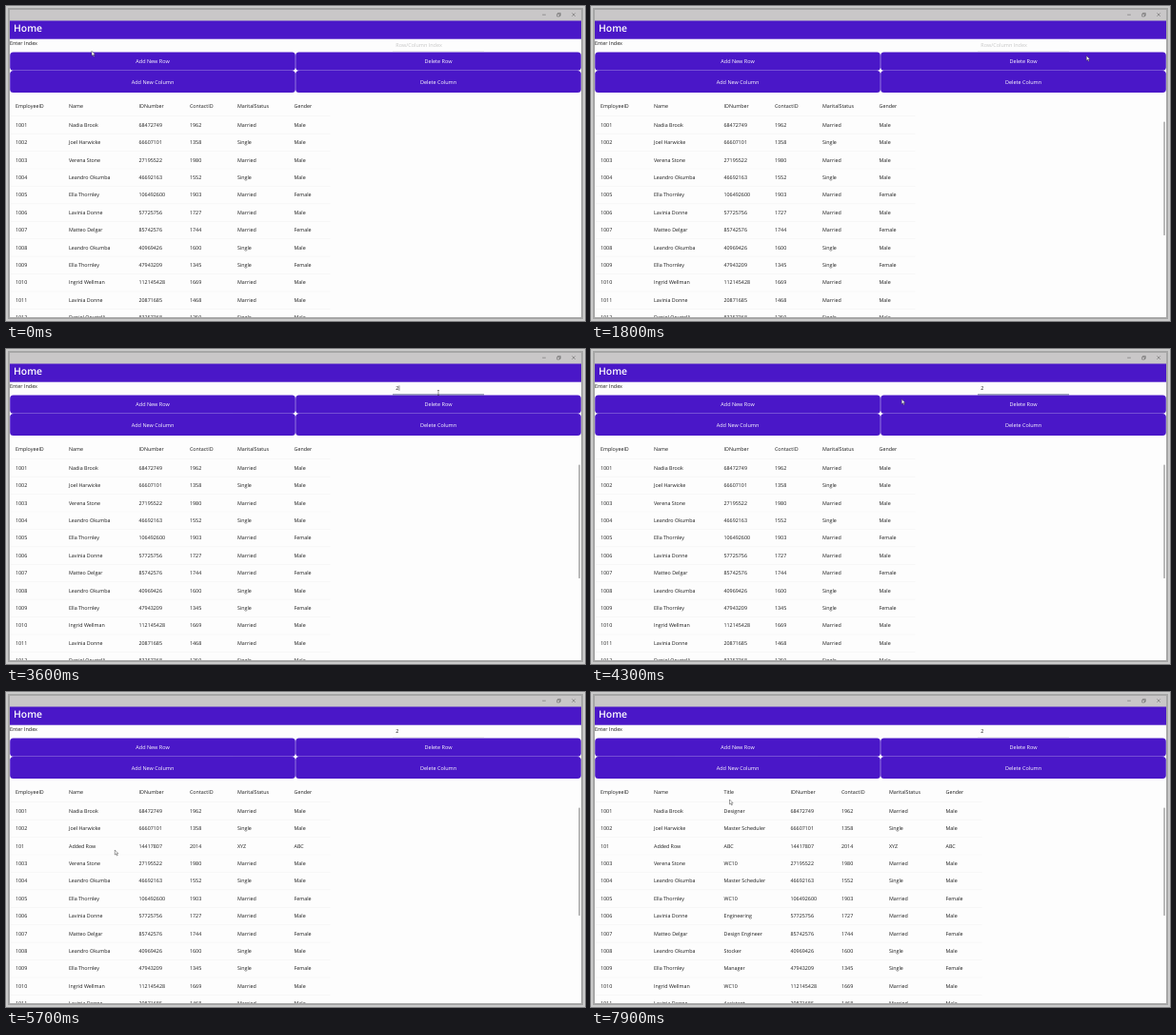
An HTML page for the animation above (8 s loop, 608 px wide and 331 px high).

```html
<!DOCTYPE html>
<html lang="en">
<head>
<meta charset="utf-8">
<title>Data grid demo</title>
<style>
  html, body { margin: 0; width: 100%; height: 100%; overflow: hidden; background: #cbcbcb; }
  svg { display: block; width: 100vw; height: 100vh; }
  text { font: 5.35px "Open Sans", "Noto Sans", sans-serif; fill: #181818; text-rendering: geometricPrecision; white-space: pre; }
  .title { font-size: 10.4px; font-weight: 600; fill: #fff; }
  .label { font-size: 5.45px; }
  .button { font-size: 5.5px; fill: #fff; text-anchor: middle; }
  .hint { font-size: 5.5px; fill: #c6c6c6; }
</style>
</head>
<body>
<svg id="stage" viewBox="0 0 608 331" xmlns="http://www.w3.org/2000/svg">
  <defs><clipPath id="view"><rect x="4" y="92" width="600" height="235"/></clipPath></defs>
  <rect width="608" height="331" fill="#cbcbcb"/>
  <rect x="3" y="3" width="602" height="325" fill="#fdfdfd" stroke="#a6a6a6" stroke-width="2"/>
  <rect x="4" y="4" width="600" height="12" fill="#c9c7c8"/>
  <g fill="none" stroke="#555" stroke-width=".5">
    <path d="M563.2 9.2h3.6M594.4 7.4l3.4 3.4m0-3.4l-3.4 3.4"/>
    <path d="M578.7 8.3h2.7v2.7h-2.7zM579.6 8.3v-.9h2.7v2.7h-.9"/>
  </g>
  <rect x="4" y="15.5" width="600" height="19.2" fill="#4a17c8"/>
  <text class="title" x="8" y="27.2">Home</text>
  <text class="label" x="4" y="40.7">Enter Index</text>
  <g id="buttons"></g>
  <rect id="line" x="406" width="96"/>
  <text id="entry" x="409.3" y="42.9"></text>
  <rect id="caret" y="38.4" width=".5" height="5.4" fill="#222"/>
  <g id="grid" clip-path="url(#view)"></g>
  <rect id="bar" x="601.4" y="121.5" width="1.3" rx=".6" fill="#979797"/>
  <path id="arrow" d="M0 0V5L1.2 4L2.1 6L2.9 5.6L2 3.7H3.6Z" fill="#fff" stroke="#333" stroke-width=".45"/>
  <path id="beam" d="M-1 -2.5H1M0 -2.5V2.5M-1 2.5H1" fill="none" stroke="#333" stroke-width=".5"/>
</svg>
<script>
const LOOP = 8000, STEP = 100;
const FOCUS = 2600, TYPED = 3300, ROW_ADDED = 4700, COLUMN_ADDED = 7400;
const PITCH = 18.42;

const columns = [
  ["EmployeeID", 10], ["Name", 66], ["IDNumber", 139.5],
  ["ContactID", 193], ["MaritalStatus", 243], ["Gender", 302.5]
];
const records = [
  "1001|Nadia Brook|68472749|1962|Married|Male|Designer",
  "1002|Joel Harwicke|66607101|1358|Single|Male|Master Scheduler",
  "1003|Verena Stone|27195522|1980|Married|Male|WC10",
  "1004|Leandro Okumba|46692163|1552|Single|Male|Master Scheduler",
  "1005|Ella Thornley|106492600|1903|Married|Female|WC10",
  "1006|Lavinia Donne|57725756|1727|Married|Male|Engineering",
  "1007|Matteo Delgar|85742576|1744|Married|Female|Design Engineer",
  "1008|Leandro Okumba|40969426|1600|Single|Male|Stocker",
  "1009|Ella Thornley|47943209|1345|Single|Female|Manager",
  "1010|Ingrid Wellman|112145428|1669|Married|Male|WC10",
  "1011|Lavinia Donne|20871685|1468|Married|Male|Assistant",
  "1012|Daniel Orvatelli|83257368|1250|Single|Male|Stocker"
].map(r => r.split("|"));
const addedRow = "101|Added Row|14417807|2014|XYZ|ABC|ABC".split("|");

// time, x, y of the pointer
const path = [
  [0, 90, 47.3], [300, 90, 47.3], [800, 215, 98], [1400, 440, 72],
  [1800, 520.3, 52.2], [2000, 518, 50], [2500, 454, 43], [3000, 454, 43],
  [3600, 454, 46], [3900, 452, 46], [4500, 282.3, 55.2], [4900, 282.3, 55.2],
  [5300, 170, 135], [5700, 114.3, 166], [6400, 114.3, 163],
  [6900, 166, 84], [7100, 168, 82.5], [7500, 168, 82.5], [7900, 145.5, 113], [8000, 145.5, 113]
];

const $ = id => document.getElementById(id);
const show = (id, on) => $(id).setAttribute("visibility", on ? "visible" : "hidden");
const place = (id, x, y) => $(id).setAttribute("transform", `translate(${x} ${y})`);

function add(parent, tag, attrs, text = "") {
  const el = document.createElementNS("http://www.w3.org/2000/svg", tag);
  for (const key in attrs) el.setAttribute(key, attrs[key]);
  el.textContent = text;
  parent.append(el);
}

function addButton(x, y, height, label) {
  add($("buttons"), "rect", { x, y, width: 299.6, height, rx: 3.5, fill: "#4a17c8" });
  add($("buttons"), "text", { class: "button", x: x + 149.8, y: y + height / 2 + 2.1 }, label);
}

function drawGrid(hasRow, hasColumn) {
  const grid = $("grid");
  grid.replaceChildren();
  const shift = hasColumn ? 70 : 0;
  const heads = columns.map(([name, x], i) => ({ name, x: i > 1 ? x + shift : x, i }));
  if (hasColumn) heads.splice(2, 0, { name: "Title", x: 139.5, i: 6 });
  const rows = records.slice();
  if (hasRow) rows.splice(2, 0, addedRow);

  heads.forEach(h => add(grid, "text", { x: h.x, y: 106.5 }, h.name));
  rows.forEach((row, r) => {
    const top = 115.5 + r * PITCH;
    add(grid, "rect", { x: 4.5, y: top, width: 336 + shift, height: .5, fill: "#f1f1f1" });
    heads.forEach(h => add(grid, "text", { x: h.x, y: top + 11.2 }, row[h.i]));
  });
}

function pointerAt(t) {
  const i = Math.max(1, path.findIndex(p => p[0] > t));
  const [t0, x0, y0] = path[i - 1], [t1, x1, y1] = path[i];
  const k = (t - t0) / (t1 - t0), e = k * k * (3 - 2 * k);
  return [x0 + (x1 - x0) * e, y0 + (y1 - y0) * e];
}

let gridState = "";
function render(t) {
  const hasRow = t >= ROW_ADDED, hasColumn = t >= COLUMN_ADDED;
  const state = `${hasRow}${hasColumn}`;
  if (state !== gridState) drawGrid(hasRow, hasColumn);
  gridState = state;

  const focused = t >= FOCUS && t < ROW_ADDED, typed = t >= TYPED;
  $("entry").textContent = typed ? "2" : "Row/Column Index";
  $("entry").setAttribute("class", typed ? "label" : "hint");
  $("line").setAttribute("y", 47.5);
  $("line").setAttribute("height", focused ? .8 : .4);
  $("line").setAttribute("fill", focused ? "#3f4a78" : "#d2d2d2");
  $("caret").setAttribute("x", typed ? 412.7 : 409.3);
  show("caret", focused && (t - FOCUS) % 1000 < 500);

  show("bar", (t >= 700 && t < ROW_ADDED) || t >= 5200);
  $("bar").setAttribute("height", hasRow ? 113.5 : 119.5);

  const [x, y] = pointerAt(t);
  const overEntry = x > 406 && x < 502 && y > 35 && y < 48;
  show("arrow", !overEntry);
  show("beam", overEntry);
  place(overEntry ? "beam" : "arrow", x, y);
}

addButton(4.2, 48.4, 19.3, "Add New Row");
addButton(304.2, 48.4, 19.3, "Delete Row");
addButton(4.2, 68, 23, "Add New Column");
addButton(304.2, 68, 23, "Delete Column");

const start = performance.now();
function tick() {
  const t = Math.max(0, performance.now() - start) % LOOP;
  render(Math.floor((t + 1) / STEP) * STEP % LOOP);
  requestAnimationFrame(tick);
}
tick();
</script>
</body>
</html>
```
